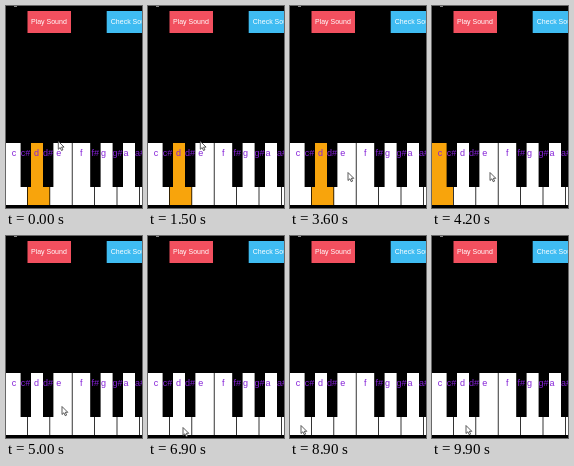
Animation of 136x202 px, one loop 10000 ms. Source, as an HTML page:

```html
<!DOCTYPE html>
<html>
<head>
<meta charset="utf-8">
<style>
html, body { margin: 0; width: 100%; height: 100%; overflow: hidden; background: #000; }
svg { display: block; width: 136px; height: 202px; }
text { font-family: "Liberation Sans", Arial, sans-serif; }
.button { font-size: 7px; fill: #fff; }
.label { font-size: 9px; fill: #8522d8; text-anchor: middle; }
</style>
</head>
<body>
<svg viewBox="0 0 136 202">
  <rect width="136" height="202"/>
  <rect x="8" width="3" height="1" fill="#888"/>
  <rect x="21.5" y="5" width="43.5" height="22" fill="#f2505f"/>
  <text class="button" x="25" y="18.3">Play Sound</text>
  <rect x="100.7" y="5" width="44" height="22" fill="#3fbcf2"/>
  <text class="button" x="104.8" y="18.3">Check Sound</text>
  <g id="keys"></g>
  <path id="cursor" d="M0 0V8L1.9 6.3 3.2 9.2 4.6 8.6 3.3 5.8H5.8Z" fill="#fff" stroke="#333" stroke-width=".8"/>
</svg>
<script>
const LOOP = 10000, STEP = 100, PITCH = 22.4;
const BEAT = 1000, LEAD = 150, MELODY = 'ddedc';
const MOVE = 800, START = [52.3, 135.3];
// [start time, x, y] of each pointer move
const moves = [[2700, 58, 166.5], [4200, 56, 170.5], [5700, 35, 191.5], [7000, 11, 189.5], [9000, 34, 189.5]];

const keys = document.getElementById('keys');
const cursor = document.getElementById('cursor');

function add(tag, attrs, text = '') {
  const el = document.createElementNS('http://www.w3.org/2000/svg', tag);
  for (const name in attrs) el.setAttribute(name, attrs[name]);
  el.textContent = text;
  return keys.appendChild(el);
}

const label = (x, text) => add('text', { class: 'label', x, y: 150 }, text);

const names = [...'cdefgab'];
const white = names.map((_, i) =>
  add('rect', { x: i * PITCH - 0.6, y: 137, width: PITCH - 0.8, height: 62 }));

names.forEach((name, i) => {
  const x = i * PITCH;
  if ('cdfga'.includes(name)) {
    // black keys sit further right in the upper group
    const left = x + (i < 3 ? 14.6 : 17);
    add('rect', { x: left, y: 137, width: 10.4, height: 44 });
    label(left + 5, name + '#');
  }
  label(x + 8, name);
});

function pointer(t) {
  let [x, y] = START;
  for (const [start, toX, toY] of moves) {
    const u = Math.min(1, Math.max(0, (t - start) / MOVE));
    const k = u * u * (3 - 2 * u);
    x += (toX - x) * k;
    y += (toY - y) * k;
  }
  return [x, y];
}

function draw() {
  const t = Math.floor(performance.now() % LOOP / STEP) * STEP;
  const note = MELODY[Math.floor((t + LEAD) / BEAT)];
  white.forEach((key, i) => key.setAttribute('fill', names[i] === note ? '#f8a40c' : '#fff'));
  cursor.setAttribute('transform', `translate(${pointer(t)})`);
  requestAnimationFrame(draw);
}
draw();
</script>
</body>
</html>
```
